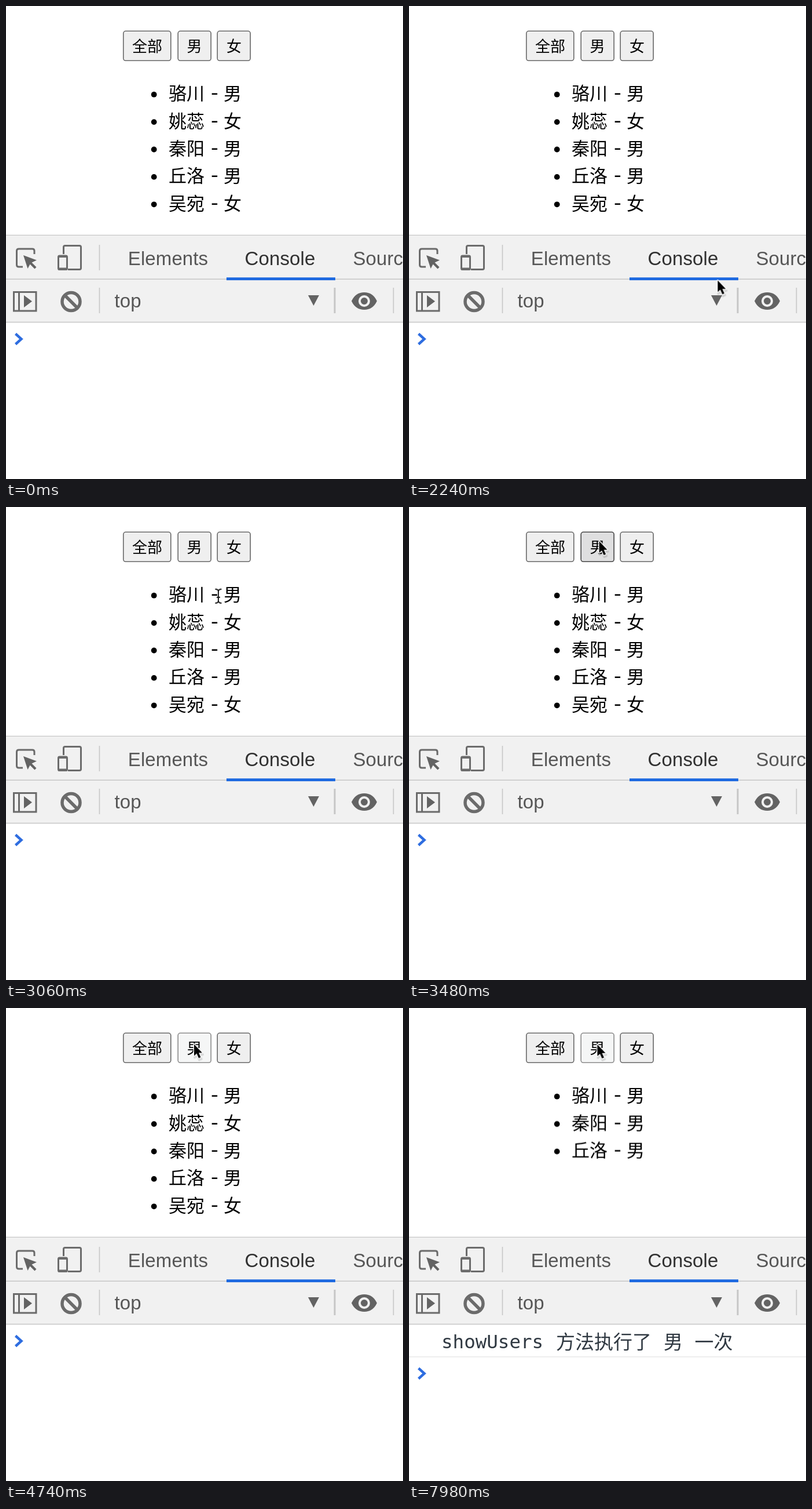
Animation, 686 px wide and 816 px high, one loop 8 s. Source, as an HTML page:

```html
<!DOCTYPE html>
<html lang="zh-CN">
<head>
<meta charset="utf-8">
<title>User filter with console</title>
<style>
html, body { margin: 0; width: 100%; height: 100%; overflow: hidden; background: #fff; }
svg { display: block; width: 686px; height: 816px; }
text { white-space: pre; }

.cjk, .list, .buttons { font-family: "Noto Sans CJK SC", "Noto Sans CJK", sans-serif; }
.buttons { font-size: 26px; }
.buttons rect { fill: #efefef; stroke: #686868; stroke-width: 1.6; }
.list { font-size: 31px; }
.list .dash { font-size: 37px; }
.tabs { font: 33px "Liberation Sans", Arial, sans-serif; letter-spacing: .1px; fill: #565656; }
.log { font: 32.5px "DejaVu Sans Mono", monospace; fill: #303942; }
.log .cjk { font-size: 33px; }
.rule { stroke: #c6c6c6; stroke-width: 1.6; }
.icon { fill: none; stroke: #6b6b6b; stroke-width: 3; }
.solid { fill: #636363; }

/* One shared 8 s timeline: 1% = 80 ms */
.hot, .out, .up, .log, .prompt, .arrow, .ibeam { animation: 8s step-end infinite; }
.buttons .hot { animation-name: press; }
.out { animation-name: leave; }
.up { animation-name: rise; }
.log { animation-name: print; }
.prompt { animation-name: drop; }
.arrow { animation-name: arrow; }
.ibeam { animation-name: ibeam; }
.pointer { animation: path 8s linear infinite; }

@keyframes press {
  0% { fill: #efefef; stroke: #686868; }
  40.9%, 63% { fill: #dfdfe0; stroke: #454545; }
  59.25%, 99.75%, 100% { fill: #f5f6f6; stroke: #8b8b8b; }
}
@keyframes leave { 0% { opacity: 1; } 63%, 100% { opacity: 0; } }
@keyframes rise { 0% { transform: none; } 63%, 100% { transform: translateY(-47.4px); } }
@keyframes print { 0% { opacity: 0; } 63.25%, 100% { opacity: 1; } }
@keyframes drop { 0% { transform: none; } 63.25%, 100% { transform: translateY(56px); } }
@keyframes arrow {
  0%, 32.6% { opacity: 0; }
  26.6%, 39.3%, 100% { opacity: 1; }
}
@keyframes ibeam {
  0%, 26.6%, 39.3%, 100% { opacity: 0; }
  12.5%, 32.6% { opacity: 1; }
}
@keyframes path {
  0%, 12.5% { transform: translate(684px, 570px); }
  14% { transform: translate(640px, 560px); }
  15.8% { transform: translate(604px, 557px); }
  17.25%, 24.25% { transform: translate(596px, 563px); }
  25.75% { transform: translate(617px, 591px); }
  30% { transform: translate(460px, 370px); }
  31.5% { transform: translate(421px, 307px); }
  33.5%, 34.75% { transform: translate(388px, 246px); }
  38.25% { transform: translate(367px, 154px); }
  40% { transform: translate(350px, 112px); }
  41% { transform: translate(342px, 90px); }
  44%, 45.25% { transform: translate(326px, 53px); }
  45.75%, 53.75% { transform: translate(325px, 50px); }
  56%, 76.9% { transform: translate(325px, 62.5px); }
  77%, 100% { transform: translate(325.5px, 63px); }
}
</style>
</head>
<body>
<svg viewBox="0 0 686 816">
  <g class="buttons">
    <rect x="202.8" y="43.3" width="82" height="51" rx="4"/>
    <rect class="hot" x="297.2" y="43.3" width="57" height="51" rx="4"/>
    <rect x="365.2" y="43.3" width="57" height="51" rx="4"/>
    <text x="218" y="78.5">全部</text>
    <text x="312.5" y="78.5">男</text>
    <text x="381" y="78.5">女</text>
  </g>

  <g class="list">
    <g>
      <circle cx="255.7" cy="152.7" r="4.9"/>
      <text y="162.2"><tspan x="281">骆川</tspan><tspan class="dash" x="354">-</tspan><tspan x="376">男</tspan></text>
    </g>
    <g class="out">
      <circle cx="255.7" cy="200.1" r="4.9"/>
      <text y="209.6"><tspan x="281">姚蕊</tspan><tspan class="dash" x="354">-</tspan><tspan x="376">女</tspan></text>
    </g>
    <g class="up">
      <circle cx="255.7" cy="247.5" r="4.9"/>
      <text y="257"><tspan x="281">秦阳</tspan><tspan class="dash" x="354">-</tspan><tspan x="376">男</tspan></text>
    </g>
    <g class="up">
      <circle cx="255.7" cy="294.9" r="4.9"/>
      <text y="304.4"><tspan x="281">丘洛</tspan><tspan class="dash" x="354">-</tspan><tspan x="376">男</tspan></text>
    </g>
    <g class="out">
      <circle cx="255.7" cy="342.3" r="4.9"/>
      <text y="351.8"><tspan x="281">吴宛</tspan><tspan class="dash" x="354">-</tspan><tspan x="376">女</tspan></text>
    </g>
  </g>

  <rect y="397" width="686" height="148" fill="#f1f1f1"/>
  <path class="rule" d="M0 395.5H686M0 471.2H686M0 545.5H686M161.5 412V456M161.5 486V530M669.5 486V530"/>
  <path class="rule" d="M568 486V530" style="stroke-width:3"/>
  <rect x="381" y="468.3" width="188" height="4.8" fill="#1b68e0"/>

  <g class="tabs">
    <text x="210.8" y="447">Elements</text>
    <text x="412.6" y="447" fill="#303030">Console</text>
    <text x="599.5" y="447">Sourc</text>
    <text x="187.5" y="520">top</text>
  </g>

  <!-- Inspect and device icons -->
  <path class="icon" d="M29 450H22Q18.5 450 18.5 446.5V422.5Q18.5 419 22 419H45.5Q49 419 49 422.5V428"/>
  <path class="solid" d="M30 430L53 438.5L44.5 442.5L52.5 450.5L49.5 453.5L41.5 445.5L37.5 453Z"/>
  <path class="icon" d="M99.5 428V416Q99.5 413.5 102 413.5H127Q129.5 413.5 129.5 416V452Q129.5 454.5 127 454.5H107"/>
  <rect class="icon" x="90.5" y="431" width="15" height="23.5" rx="2"/>
  <path class="icon" d="M90 432H106M90 453.5H106" style="stroke-width:4"/>

  <!-- Console toolbar icons -->
  <path class="icon" d="M13.5 493.5H52V526H13.5ZM22.5 493V526"/>
  <path class="solid" d="M31 499V520L45 509.5ZM522 499H541L531.5 517Z"/>
  <path class="icon" d="M101.5 499L123.5 521M97 510A15.5 15.5 0 1 0 128 510A15.5 15.5 0 1 0 97 510Z" style="stroke-width:5.5"/>
  <path class="solid" d="M597 509Q604 494 619 494T641 509Q634 524 619 524T597 509Z"/>
  <circle cx="619" cy="509" r="8" fill="#636363" stroke="#f1f1f1" stroke-width="4"/>

  <g class="log">
    <text x="56" y="587">showUsers</text>
    <text class="cjk" y="587.5"><tspan x="254">方法执行了</tspan><tspan x="440">男</tspan><tspan x="493.5">一次</tspan></text>
    <path d="M0 601.7H686" stroke="#e9e9e9" stroke-width="1.6"/>
  </g>
  <path class="prompt" d="M16.5 565.5L26.5 574.5L16.5 583.5" fill="none" stroke="#2e6de0" stroke-width="4.4"/>

  <g class="pointer">
    <g class="arrow" stroke-linejoin="round">
      <path d="M0 0V20L4.500 16L8 24L11.500 22.500L8 14.800H14Z" transform="translate(1 3)" stroke="#000" stroke-width="4" opacity=".12"/>
      <path d="M0 0V20L4.500 16L8 24L11.500 22.500L8 14.800H14Z" stroke="#fff" stroke-width="2.8" paint-order="stroke"/>
    </g>
    <g class="ibeam" fill="none">
      <path d="M-5.5 -12Q0 -12 0 -8Q0 -12 5.5 -12M0 -8V8M-5.5 12Q0 12 0 8Q0 12 5.5 12M-3 2H3" stroke="#fff" stroke-width="4"/>
      <path d="M-5.5 -12Q0 -12 0 -8Q0 -12 5.5 -12M0 -8V8M-5.5 12Q0 12 0 8Q0 12 5.5 12M-3 2H3" stroke="#111" stroke-width="1.9"/>
    </g>
  </g>
</svg>
</body>
</html>
```
